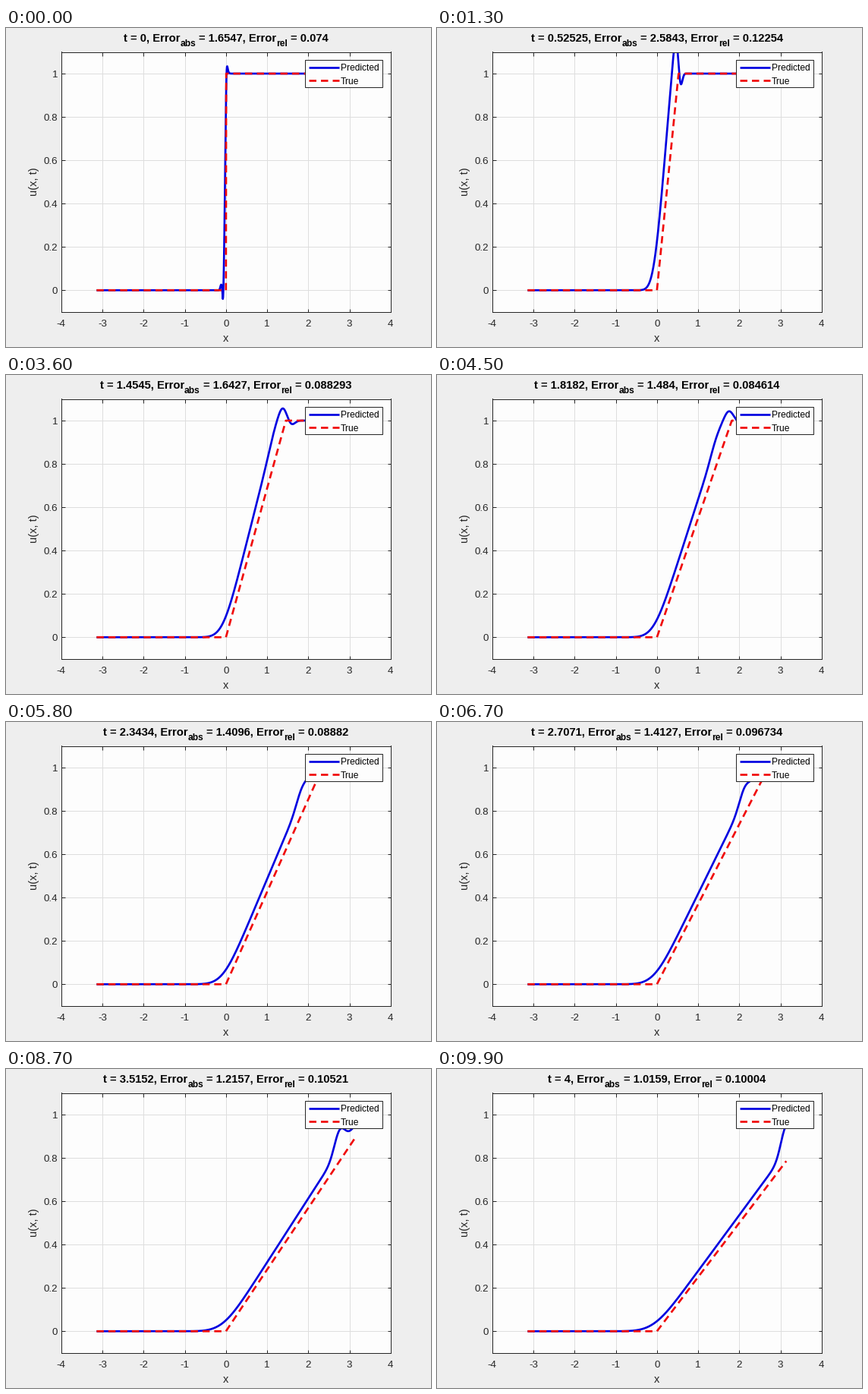
Recreate the animation shown at these times as a matplotlib script. Size 560x420 px, loop 10 s.

```python
import math

import numpy as np
import matplotlib.pyplot as plt
from matplotlib.animation import FuncAnimation
from matplotlib.patches import Rectangle

W, H, DPI = 560, 420, 80
PX = 72 / DPI
FRAMES, T_END = 100, 4.0
BLUE, RED, INK, PAPER = "#0000e0", "#f00808", "#262626", "#fdfdfd"

plt.rcParams["font.family"] = "Liberation Sans"

x = np.linspace(-np.pi, np.pi, 1001)
erf = np.vectorize(math.erf)

# Norm of the error at a few steps, linear in between
ERR_STEP = [0, 13, 27, 45, 58, 75, 99]
ERR = [1.6547, 2.5843, 1.8015, 1.48397, 1.40957, 1.41546, 1.0159]


def bell(center, width):
    return np.exp(-((x - center) / width)**2)


def exact(t):
    return np.clip(x / t, 0, 1) if t > 0 else (x > 0).astype(float)


def predicted(t):
    young = np.exp(-t / .3)

    # Ramp with a rounded foot: max(0, x + shift) blurred by a Gaussian
    soft = .012 + .165 * np.sqrt(t)
    z = (x + .08 - .025 * young) / soft
    foot = z * (1 + erf(z / np.sqrt(2))) / 2 + np.exp(-z**2 / 2) / np.sqrt(2 * np.pi)
    u = soft * foot / (t - .12 + .19 * young)

    # Steepening behind the front, then the switch to the plateau and its dip
    u += .0075 * t**2 * bell(.785 * t, .18)
    front, width = t - .05 + .06 * young, .012 + .033 * t
    u = 1 + (u - 1) / (1 + np.exp(np.clip((x - front) / width, -50, 50)))
    u -= .16 * np.exp(-t / .8) * (1 - young) * bell(front + 3 * width, 2 * width)

    # Short-lived wiggle at the jump
    wiggle = .026 * bell(-.115, .03) - .05 * bell(-.073, .014)
    return u + wiggle * np.exp(-t / .05)


fig = plt.figure(figsize=(W / DPI, H / DPI), dpi=DPI, facecolor="#eeeeee")
ax = fig.add_axes([.13, .11, .775, .815], facecolor=PAPER)
ax.set(xlim=(-4, 4), ylim=(-.1, 1.1), xticks=range(-4, 5), yticks=np.arange(6) / 5)
ax.set_axisbelow(True)
ax.grid(color="#dedede", lw=PX)
ax.tick_params(direction="in", top=True, right=True, length=4.5 * PX, width=PX,
               color=INK, labelbottom=False, labelleft=False)
for side in ax.spines.values():
    side.set(color=INK, linewidth=PX)


def label(px, py, s, size, **kw):
    kw = {"color": INK, "va": "baseline", **kw}
    return fig.text(px / W, 1 - py / H, s, fontsize=size * PX, **kw)


for v in range(-4, 5):
    label(289.8 + 54.25 * v, 393, str(v), 13.33, ha="center")
for v in range(6):
    label(68, 350.5 - 57.05 * v, f"{v / 5:g}", 13.33, ha="right")
label(289.8, 413, "x", 14.67, ha="center")
label(44, 202, "u(x, t)", 14.67, rotation=90, ha="right", va="center")

dash = dict(color=RED, lw=2.67 * PX, dashes=(9.5 / 2.67, 6 / 2.67),
            dash_capstyle="butt")
solid = dict(color=BLUE, lw=2.67 * PX, solid_capstyle="butt", solid_joinstyle="round")
pred_line, = ax.plot([], [], **solid)
true_line, = ax.plot([], [], **dash)

# Legend
key = fig.add_axes([0, 0, 1, 1], xlim=(0, W), ylim=(H, 0))
key.axis("off")
key.add_patch(Rectangle((394, 42), 102, 36, fc=PAPER, ec=INK, lw=PX))
for y, name, style in ((52, "Predicted", solid), (69, "True", dash)):
    key.plot([399, 438.5], [y, y], **style)
    key.text(441, y + 4.5, name, fontsize=12 * PX, color="black", va="baseline")

# Title: main text with lowered subscripts, centred as one run
SIZES = [14.75, 12, 14.75, 12, 14.75]
parts = [label(0, 18 if size > 12 else 24.5, "", size, weight="bold", color="black")
         for size in SIZES]
probe = label(0, 0, "", 12, weight="bold", alpha=0)


def advance(s, size):
    """Width of s including outer spaces."""
    probe.set_fontsize(size * PX)
    widths = []
    for text in (f"|{s}|", "||"):
        probe.set_text(text)
        widths.append(probe.get_window_extent().width)
    probe.set_text("")
    return widths[0] - widths[1]


def set_title(t, err, rel):
    runs = [f"t = {t:.5g}, Error", "abs", f" = {err:.5g}, Error", "rel", f" = {rel:.5g}"]
    widths = [advance(s, size) for s, size in zip(runs, SIZES)]
    pos = 289.8 - sum(widths) / 2
    for part, s, size, w in zip(parts, runs, SIZES, widths):
        lead = advance(" ", size) if s.startswith(" ") else 0
        part.set_text(s.strip())
        part.set_x((pos + lead) / W)
        pos += w


def update(i):
    t = T_END * i / (FRAMES - 1)
    u = exact(t)
    pred_line.set_data(x, predicted(t))
    true_line.set_data(x, u)
    err = np.interp(i, ERR_STEP, ERR)
    set_title(t, err, err / np.linalg.norm(u))
    return [pred_line, true_line, *parts]


anim = FuncAnimation(fig, update, frames=FRAMES, interval=100, repeat=True,
                     repeat_delay=0, blit=False)
plt.show()
```
